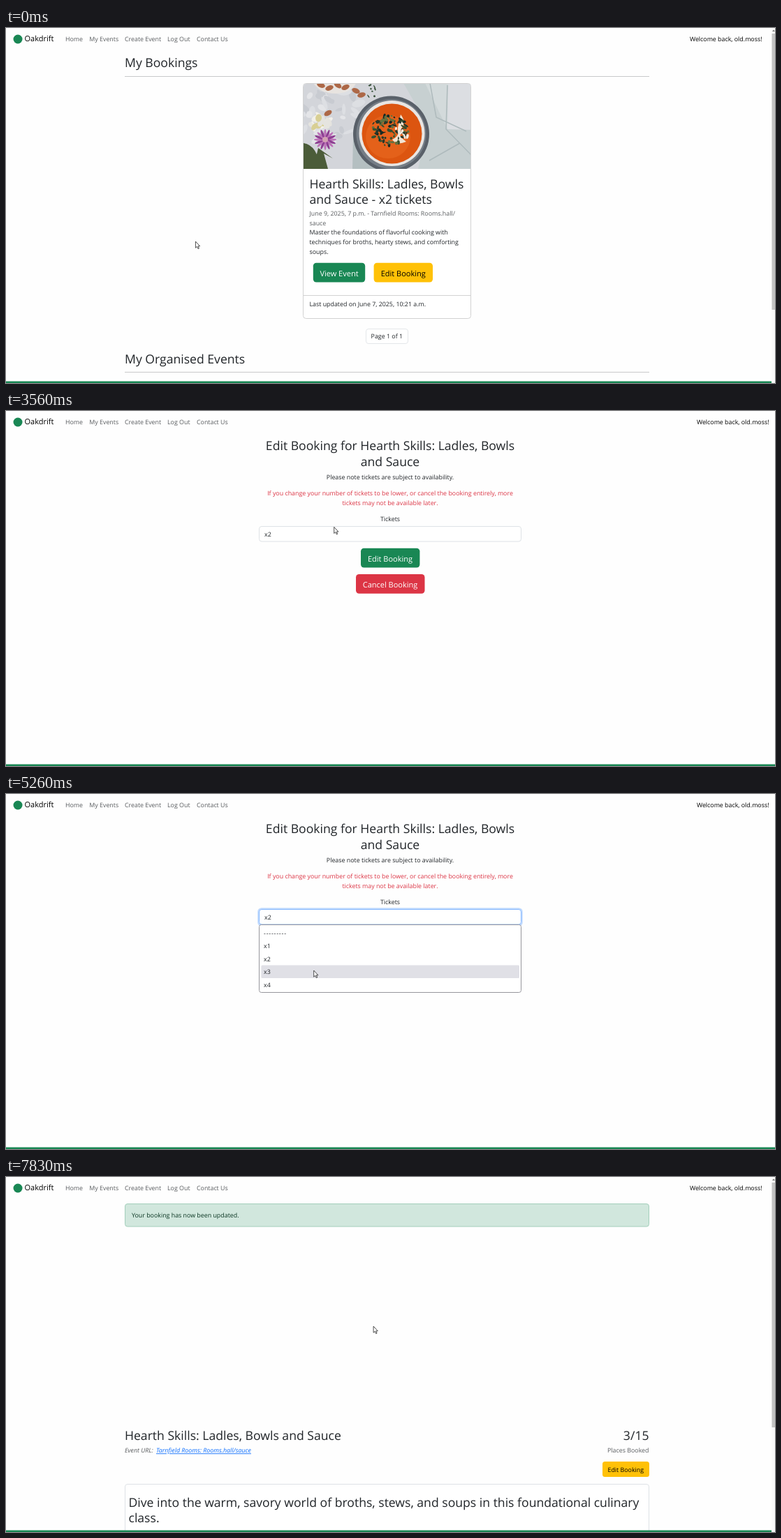
Recreate the animation shown at these times as an HTML page. Size 1101 px wide and 509 px high, loop 7.99 s.

```html
<!DOCTYPE html>
<html lang="en">
<head>
<meta charset="utf-8">
<title>Edit a booking</title>
<style>
  html, body { margin: 0; height: 100%; overflow: hidden; background: #fefefe; }
  svg { display: block; width: 100vw; height: 100vh; }
  text {
    font: 8.85px "Open Sans", "Noto Sans", sans-serif; fill: #212529;
    white-space: pre; text-rendering: geometricPrecision;
  }
  .h { font-size: 17.6px; }
  .b { font-size: 11px; }
  .mid { text-anchor: middle; }
  .end { text-anchor: end; }
  .grey { fill: #595c5f; }
  .red { fill: #dc3545; }
  .white { fill: #fff; }
  .black { fill: #000; }
  .note { fill: #0a3622; }
  .it { font-style: italic; }
  .link { fill: #0d6efd; text-decoration: underline; }
  .dash { letter-spacing: .8px; }
</style>
</head>
<body>
<svg id="stage" viewBox="0 0 1101 509"></svg>
<script>
const GREEN = '#198754', YELLOW = '#ffc107', LINE = '#dee2e6';
const TITLE = 'Hearth Skills: Ladles, Bowls', TITLE_END = 'and Sauce';
const DURATION = 7990;
const ROW_TOP = 190.4, ROW_HEIGHT = 18.4;

const text = (x, y, s, cls = '') => `<text x="${x}" y="${y}" class="${cls}">${s}</text>`;
const box = (x, y, w, h, fill, stroke = 'none', r = 0, extra = '') =>
  `<rect x="${x}" y="${y}" width="${w}" height="${h}" rx="${r}" fill="${fill}" stroke="${stroke}" ${extra}/>`;
const path = (d, fill, stroke = 'none', width = 1) =>
  `<path d="${d}" fill="${fill}" stroke="${stroke}" stroke-width="${width}"/>`;
const dot = (x, y, rx, ry, fill, turn = 0) =>
  `<ellipse rx="${rx}" ry="${ry}" fill="${fill}" transform="translate(${x} ${y}) rotate(${turn})"/>`;
const group = (id, ...parts) => `<g id="${id}">${parts.join('')}</g>`;
const rule = y => box(170, y, 751, 1, '#c8c9ca');

let seed = 7;
const random = () => (seed = seed * 16807 % 2147483647) / 2147483647;

function scatter(count, cx, cy, spread, size, colors) {
  let out = '';
  for (let i = 0; i < count; i++) {
    const a = random() * 6.283, d = spread * Math.sqrt(random());
    out += dot(cx + d * Math.cos(a), cy + d * Math.sin(a) * .8,
      size * (.5 + random()), size * (.3 + random() * .5), colors[i % colors.length], random() * 180);
  }
  return out;
}

function photo() {
  const flower = [...Array(16).keys()].map(i => {
    const a = i * Math.PI / 8;
    return dot(457 + 9 * Math.cos(a), 160 + 8 * Math.sin(a), 7, 1.7, i % 2 ? '#8d3f91' : '#bd72b8', i * 22.5);
  }).join('');
  return `<clipPath id="photo"><path d="M426 202V84q0-4 4-4H661q4 0 4 4V202z"/></clipPath><g clip-path="url(#photo)">` +
    box(425, 79, 241, 123, '#d3d5da') +
    scatter(45, 465, 125, 48, 7, ['#e4e5e8', '#dddfe3', '#c8cbd1']) +
    path('M569 79H666V202H590L604 140Z', '#c7d0d1') +
    path('M600 79L632 145 633 79Z', '#d3dadb') +
    path('M633 79H666V146L632 145Z', '#dcdee2') +
    path('M607 79L616 128 659 148M632 82L630 145 666 182M606 190L650 165', 'none', '#aebabc', 1.5) +
    path('M497 158L496 202H535Z', '#b4bfc1') +
    path('M440 79Q451 95 474 94Q496 92 501 79Z', '#e8e4e0') +
    [[451, 82, 20], [463, 86, -20], [475, 82, 35], [486, 85, -25], [501, 90, 25], [509, 96, -15], [461, 122, -30]]
      .map(([x, y, turn]) => dot(x, y, 6, 3.5, '#ad6847', turn)).join('') +
    path('M426 165Q446 168 450 202H426ZM447 172L468 187 455 180 461 202H440Z', '#4b5c39') +
    scatter(15, 450, 137, 14, 6, ['#f2f0e9', '#e5e4df', '#d8cf94']) +
    flower + dot(457, 160, 4, 4, '#d2a2b3') +
    scatter(8, 524, 91, 12, 2, ['#38503a']) +
    dot(551.5, 152, 54.5, 54.5, '#596069') + dot(551.5, 152, 50, 50, '#757d86') +
    dot(552.5, 151, 47, 47, '#e9e6e3') + dot(552.5, 151.5, 43, 43, '#dc5510') +
    dot(547, 156, 32, 31, '#e4611a') +
    path('M565 124Q574 136 566 144T573 163Q559 169 553 160Q565 154 561 143Z', '#f2e5d3') +
    scatter(85, 549, 147, 27, 2.8, ['#26392b', '#38502f', '#192a23', '#64713e']) +
    scatter(9, 566, 150, 13, 3, ['#f0e8dc']) + '</g>';
}

const scroller = end => box(1096, 0, 5, 509, '#f9f9f9') + box(1096.5, 8, 4.5, end - 8, '#c3c3c3') +
  path('M1097 5l2-2.5 2 2.5z', '#777');
const greeting = x => text(x, 19.2, 'Welcome back, old.moss!', 'end black');
const heading = (x, y, s, cls = '') => text(x, y, s, 'h ' + cls);
const label = (x, y, s, cls) => text(x, y, s, 'b mid ' + cls);

const header = `<circle cx="17" cy="16" r="6.5" fill="${GREEN}"/>` + text(26.5, 19.4, 'Oakdrift', 'b black') +
  [[85, 'Home'], [119.3, 'My Events'], [170, 'Create Event'], [231, 'Log Out'], [273, 'Contact Us']]
    .map(([x, s]) => text(x, 19.2, s, 'grey')).join('');

const bookings = group('bookings',
  heading(170, 56, 'My Bookings'), rule(69),
  box(425.5, 79.5, 240, 337, '#fff', '#d2d2d2', 4), photo(),
  heading(434.5, 230, TITLE), heading(434.5, 252, TITLE_END + ' - x2 tickets'),
  text(434.5, 268.5, 'June 9, 2025, 7 p.m. - Tarnfield Rooms: Rooms.hall/', 'grey'),
  text(434.5, 282.5, 'sauce', 'grey'),
  ['Master the foundations of flavorful cooking with',
    'techniques for broths, hearty stews, and comforting', 'soups.']
    .map((s, i) => text(434.5, 296.4 + 14 * i, s)).join(''),
  box(439.8, 336.8, 74.4, 27.8, GREEN, 'none', 4.5), label(477, 355.6, 'View Event', 'white'),
  box(526.6, 336.8, 84.4, 27.8, YELLOW, 'none', 4.5, 'id="open"'), label(568.7, 355.6, 'Edit Booking', 'black'),
  box(426, 383, 239, 1, '#d2d2d2'),
  text(434.5, 399, 'Last updated on June 7, 2025, 10:21 a.m.'),
  box(515.5, 431.5, 60, 21, '#fff', '#e4e7ea', 3.5), text(545.3, 445.4, 'Page 1 of 1', 'mid'),
  heading(170, 481, 'My Organised Events'), rule(493),
  greeting(1082.5), scroller(404));

const form = group('form',
  heading(550, 56, 'Edit Booking for ' + TITLE, 'mid'), heading(550, 79, TITLE_END, 'mid'),
  text(550, 97.5, 'Please note tickets are subject to availability.', 'mid'),
  text(550, 120.8, 'If you change your number of tickets to be lower, or cancel the booking entirely, more', 'mid red'),
  text(550, 134.6, 'tickets may not be available later.', 'mid red'),
  text(550, 157.8, 'Tickets', 'mid'),
  box(361.4, 164.4, 377.2, 24.2, 'none', '#c2dbfe', 4.5, 'id="ring" stroke-width="2.4"'),
  box(362.5, 165.5, 375, 21.5, '#fff', LINE, 3.5, 'id="select"'),
  '<text id="value" x="370" y="180.4"></text>',
  box(508, 196.8, 84.4, 27.8, GREEN, 'none', 4.5, 'id="save"'), label(550, 215.6, 'Edit Booking', 'white'),
  box(501, 234, 98.5, 27.8, '#dc3545', 'none', 4.5), label(550, 252.8, 'Cancel Booking', 'white'),
  group('menu',
    box(362.5, 187.5, 375, 97, '#fff', '#96969c', 3),
    box(365.5, 0, 369.5, ROW_HEIGHT, '#e0e0e6', 'none', 1.5, 'id="mark"'),
    text(369, 203, '---------', 'dash'),
    [1, 2, 3, 4].map(i => text(369, 203 + i * ROW_HEIGHT, 'x' + i)).join('')),
  greeting(1092.5));

const detail = group('detail',
  box(170.5, 38.5, 750, 32.5, '#d1e7dd', '#a3cfbb', 3.5),
  text(180, 58, 'Your booking has now been updated.', 'note'),
  heading(170, 376.5, TITLE + ' ' + TITLE_END), heading(920.5, 376.5, '3/15', 'end'),
  text(170, 395.3, 'Event URL: ', 'it grey'),
  text(215, 395.3, 'Tarnfield Rooms: Rooms.hall/sauce', 'it link'),
  text(920.5, 395.3, 'Places Booked', 'end grey'),
  box(854, 408, 67, 22, YELLOW, 'none', 3.5), text(887.3, 422.6, 'Edit Booking', 'mid black'),
  box(170.5, 440.5, 750, 90, '#fff', LINE, 3.5),
  heading(175.5, 472.6, 'Dive into the warm, savory world of broths, stews, and soups in this foundational culinary'),
  heading(175.5, 494.8, 'class.'),
  greeting(1082.5), scroller(359));

const pointer = group('pointer',
  '<g id="arrow">' + path('M.4.5V9.7L2.5 7.8 4 11.1 5.4 10.5 4 7.3H6.6Z', '#fff', '#222', .8) + '</g>',
  '<g id="hand">' + path('M-1.1 8.8V1.2Q-1.1.3 0 .3T1.1 1.2V5Q2.6 4.4 3 5.6 4.4 5 4.8 6.2 6 6 6 7.5V10' +
    'Q6 14.3 3 14.5H1Q0 14.3-1 12.7L-3.2 9.6Q-3.4 7.6-1.1 8.8Z', '#fff', '#222', .8) + '</g>');

document.getElementById('stage').innerHTML =
  header + bookings + form + detail + box(0, 506.5, 1101, 2.5, GREEN, 'none', 0, 'id="bar"') + pointer;

// The pointer jumps between sampled positions: time, x, y.
const moves = [
  [0, 271, 305.5], [680, 288, 309], [800, 345, 324], [920, 425, 347], [1050, 492, 368], [1170, 519, 373.5],
  [1310, 541, 367], [1430, 574, 358], [1550, 590, 353.5], [1700, 540.7, 357.5],
  [2620, 543, 355], [2740, 549, 351], [2870, 554, 348], [3020, 554.5, 347.3],
  [3170, 548, 356], [3290, 510, 285], [3440, 485, 215], [3560, 469.3, 165.8],
  [3930, 468, 171], [4050, 467, 175.3], [4510, 466.7, 189],
  [4630, 462, 205], [4750, 454, 225], [4870, 446, 241], [4990, 442, 249], [5140, 441, 251], [5260, 440.3, 252.5],
  [5940, 460, 238], [6070, 486, 221.8], [6210, 513, 215.5], [6330, 525.7, 213.5]
];

const el = id => document.getElementById(id);
const show = (id, on) => el(id).setAttribute('display', on ? 'inline' : 'none');
const paint = (id, name, value) => el(id).setAttribute(name, value);

function draw(now) {
  const t = now % DURATION;
  const within = (from, to) => t >= from && t < to;
  const [, x, y] = moves.findLast(move => move[0] <= t);

  show('bookings', t < 2620);
  show('form', within(2620, 7710));
  show('detail', t >= 7710);
  paint('bar', 'width', within(2620, 7710) ? 1101 : 1096);

  paint('open', 'fill', t >= 1430 ? '#ffca2c' : YELLOW);
  paint('save', 'fill', t >= 6210 ? '#157347' : GREEN);

  const focused = within(4200, 6820);
  show('ring', focused);
  paint('select', 'stroke', focused ? '#86b7fe' : LINE);
  el('value').textContent = t < 5660 ? 'x2' : 'x3';

  const row = y < ROW_TOP ? 2 : Math.floor((y - ROW_TOP) / ROW_HEIGHT);
  show('menu', within(3930, 5660));
  show('mark', t >= 4200);
  paint('mark', 'y', ROW_TOP + row * ROW_HEIGHT);

  const clickable = within(1430, 2370) || within(6210, 7710);
  show('hand', clickable);
  show('arrow', !clickable);
  paint('pointer', 'transform', `translate(${x} ${y})`);
}

const start = performance.now();
function tick() {
  draw(performance.now() - start);
  requestAnimationFrame(tick);
}
tick();
</script>
</body>
</html>
```
